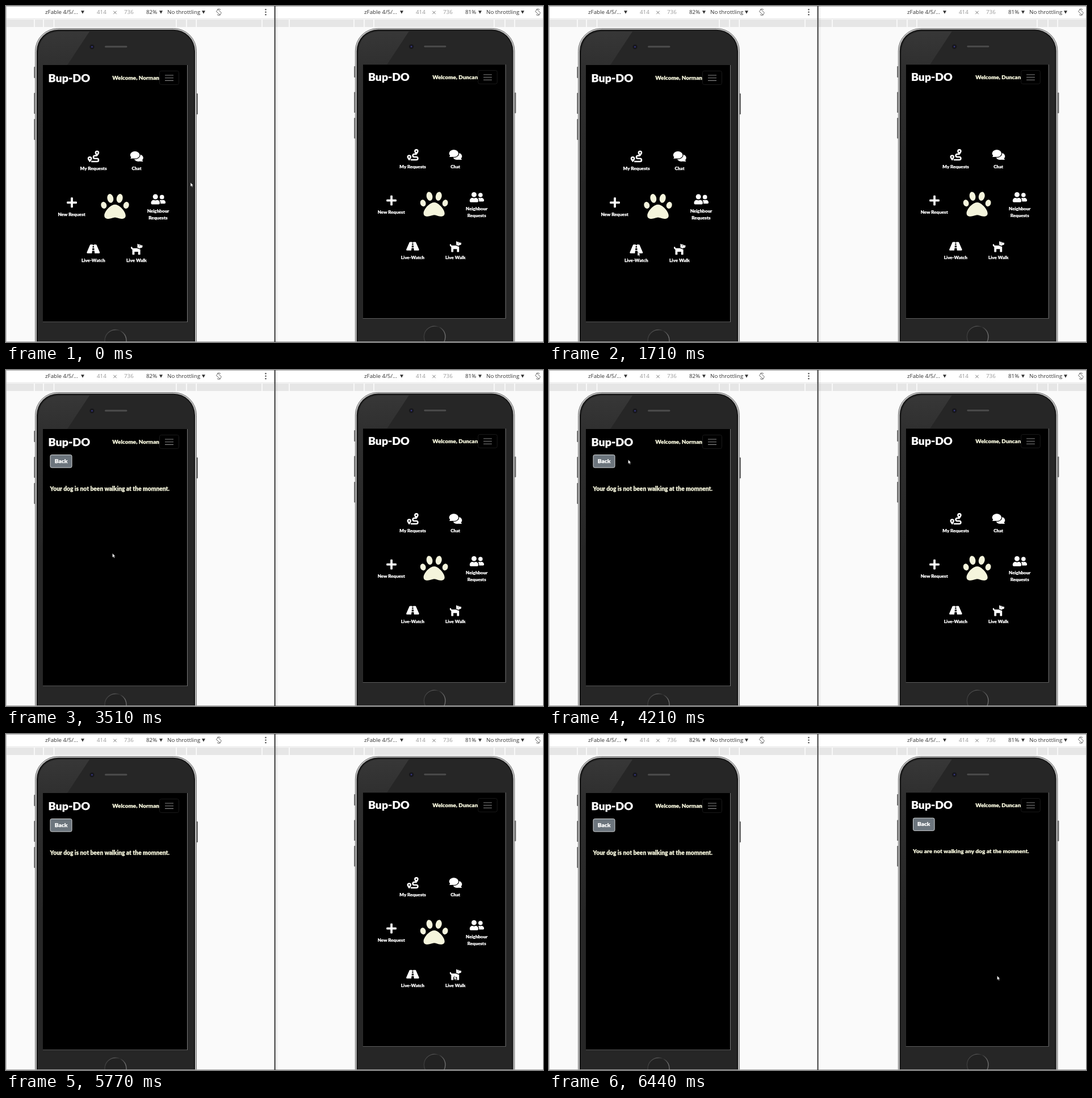
An HTML page that plays this animation: 946 by 592 pixels, repeating every 8 s.

```html
<!DOCTYPE html>
<html lang="en">
<head>
<meta charset="utf-8">
<title>Two device previews</title>
<style>
  html, body { margin: 0; width: 100%; height: 100%; overflow: hidden; background: #fafafa; }
  svg { display: block; width: 100vw; height: 100vh; }
  .bar { font: 9.8px "Open Sans", "Noto Sans", sans-serif; fill: #333; }
  .bar .dim { fill: #999; }
  .app { font-family: Lato, "Open Sans", sans-serif; font-weight: 900; }
  .app text { stroke-width: .25; stroke-linejoin: round; }
  .white { fill: #fff; stroke: #fff; }
  .beige { fill: #f5f5dc; stroke: #f5f5dc; }
  .label { font-size: 8.1px; text-anchor: middle; }
</style>
</head>
<body>
<svg id="stage" viewBox="0 0 946 592" xmlns="http://www.w3.org/2000/svg"></svg>
<script>
const LOOP = 8000;
const LEFT_OPENS = 1860, RIGHT_OPENS = 6440;

// time, x, y: the pointer is held until the next entry
const pointer = [
  [0, 325, 311], [280, 459, 342], [510, 520, 345], [630, 470, 358],
  [760, 330, 385], [880, 220, 405], [1010, 162, 416], [1160, 158, 427],
  [1280, 156, 432], [1430, 156, 433], [2720, 168, 408], [2840, 187, 362],
  [2960, 199, 331], [3110, 193, 330], [3230, 189.5, 331], [3510, 187.5, 323],
  [3660, 183, 268], [3780, 175, 209], [3930, 162, 180], [4060, 148.5, 159],
  [4210, 139.5, 158], [4360, 121, 158], [4520, 101.5, 160], [4950, 710, 405],
  [5200, 793, 408], [5350, 821, 425], [5500, 806, 425], [5650, 795, 426],
  [5770, 789.5, 426]
];

const rect = (x, y, w, h, fill, r = 0, more = '') =>
  `<rect x="${x}" y="${y}" width="${w}" height="${h}" rx="${r}" fill="${fill}" ${more}/>`;
const circle = (x, y, r, more = '') => `<circle cx="${x}" cy="${y}" r="${r}" ${more}/>`;
const oval = (x, y, rx, ry, more = '') => `<ellipse cx="${x}" cy="${y}" rx="${rx}" ry="${ry}" ${more}/>`;
const path = (d, more = '') => `<path d="${d}" ${more}/>`;
const text = (x, y, words, cls, more = '') => `<text x="${x}" y="${y}" class="${cls}" ${more}>${words}</text>`;

// Icons are drawn on a 512-unit high grid and centred on x, y
const icon = (x, y, w, shapes, scale = .04, fill = '#fff') =>
  `<g transform="translate(${x} ${y}) scale(${scale}) translate(${-w / 2} -256)" fill="${fill}">${shapes}</g>`;

const pin = path('M96 256a96 96 0 0 0-96 96c0 53 96 160 96 160s96-107 96-160a96 96 0 0 0-96-96zm0 64a32 32 0 1 1 0 64 32 32 0 1 1 0-64z', 'fill-rule="evenodd"');
const route = pin + `<g transform="translate(320 -256)">${pin}</g>` +
  path('M160 480H416a64 64 0 0 0 0-128H320a64 64 0 0 1 0-128H416', 'fill="none" stroke="#fff" stroke-width="64"');

const chat = oval(368, 320, 208, 160) + path('M568 478Q530 440 516 380L430 466Q500 484 568 478z') +
  oval(208, 192, 240, 192, 'fill="#000"') +
  oval(208, 192, 208, 160) + path('M8 350Q46 312 56 250L146 338Q80 356 8 350z');

const plus = rect(0, 208, 448, 96, '#fff', 32) + rect(176, 32, 96, 448, '#fff', 32);

const people = circle(192, 144, 112) + circle(480, 160, 96) +
  path('M269 288h-8a160 160 0 0 1-138 0h-8A115 115 0 0 0 0 403v29a48 48 0 0 0 48 48h288a48 48 0 0 0 48-48v-29a115 115 0 0 0-115-115z') +
  path('M528 288h-4a126 126 0 0 1-88 0h-4q-30 0-56 15 40 43 40 101v44h176a48 48 0 0 0 48-48a112 112 0 0 0-112-112z');

const road = path('M170 64Q150 64 142 83L3 403Q-6 448 30 448H227L238 350Q240 336 254 336H322Q336 336 338 350L349 448H545Q582 448 573 403L433 83Q425 64 406 64H308L311 96H265L268 64z' +
  'M261 128H315L322 192H254zM251 224H325L333 304H243z', 'fill-rule="evenodd"');

const dog = path('M298 224L448 278V496a16 16 0 0 1-16 16h-64a16 16 0 0 1-16-16V384H192v112a16 16 0 0 1-16 16h-64a16 16 0 0 1-16-16V282C59 269 32 234 32 192a32 32 0 0 1 64 0 32 32 0 0 0 32 32z') +
  path('M544 112v32a64 64 0 0 1-64 64h-32v36l-128-46V48c0-14 17-21 27-11l28 27h53q20 2 29 18l7 14h64a16 16 0 0 1 16 16zm-112 0a16 16 0 1 0-32 0 16 16 0 0 0 32 0z', 'fill-rule="evenodd"');

const toes = oval(54, 236, 50, 62, 'transform="rotate(-18 54 236)"') +
  oval(172, 112, 55, 81, 'transform="rotate(-12 172 112)"');
const paw = toes + `<g transform="translate(512) scale(-1 1)">${toes}</g>` +
  path('M256 224c-79 0-192 123-192 200c0 35 27 56 72 56c49 0 81-25 120-25c40 0 72 25 120 25c45 0 72-21 72-56C448 347 335 224 256 224z');

const label = (x, y, words) => text(x, y, words, 'label white');

const menu = () =>
  icon(154, 265, 512, route) + label(154, 289, 'My Requests') +
  icon(230.3, 265, 576, chat) + label(230, 289, 'Chat') +
  icon(116, 346.3, 448, plus) + label(115.7, 370, 'New Request') +
  icon(192, 353, 512, paw, .0977, '#f5f5dc') +
  icon(268.3, 340.5, 640, people) + label(268, 364, 'Neighbour') + label(268, 376, 'Requests') +
  icon(153.8, 428, 576, road) + label(153.8, 451.3, 'Live-Watch') +
  icon(230.2, 428, 576, dog) + label(230, 451.3, 'Live Walk');

const notice = words =>
  rect(78, 149.5, 38, 22.5, '#6c757d', 2.5, 'stroke="#d5d8da"') +
  text(97, 164, 'Back', 'white', 'font-size="10.2" text-anchor="middle"') +
  text(77.6, 212.6, words, 'beige', 'font-size="10.25"');

const sideKey = (x, y, h) => rect(x, y, 2.5, h, '#666', 1);

function phone(id, user, words) {
  return sideKey(49.3, 107, 20) + sideKey(49.3, 153, 37) + sideKey(49.3, 199, 37) + sideKey(335.5, 154, 37) +
    rect(51.5, 39.5, 284, 620, '#bdbdbd', 40, 'stroke="#777"') +
    rect(54, 41.7, 279, 620, '#141414', 38) +
    rect(56, 43.5, 275, 620, '#262626', 36) +
    path('M92 45H147L108 104H65V300L57 330V84Q58 48 92 45z', 'fill="url(#glare)"') +
    circle(151.5, 72, 4.2, 'fill="#17171c"') + circle(151.5, 72, 1.3, 'fill="#39398c"') +
    rect(173.5, 69.7, 40.5, 4, '#4b4b4b', 2, 'stroke="#1b1b1b" stroke-width=".6"') +
    circle(193, 589.5, 19, 'fill="#222" stroke="url(#ring)" stroke-width="1.3"') +
    rect(65, 104, 255, 453, '#777') + rect(65, 104, 254, 452.3, '#000') +
    '<g class="app">' +
    text(74.5, 133.5, 'Bup-DO', 'white', 'font-size="19.6"') +
    text(270, 130, `Welcome, ${user}`, 'beige', 'font-size="9.9" text-anchor="end"') +
    rect(270.5, 114.5, 34, 24, 'none', 3, 'stroke="#1a1a1a"') +
    path('M280 122H295M280 126.7H295M280 131.4H295', 'stroke="#858585" stroke-width="1.1"') +
    `<g id="menu${id}">${menu()}</g><g id="notice${id}">${notice(words)}</g></g>`;
}

const caret = x => path(`M${x - 3} 8.3h6l-3 5.4z`, 'fill="#333"');

function toolbar(x, zoom) {
  return `<g class="bar" transform="translate(${x})">` +
    text(69, 14.3, 'zFable 4/5/...', '') + caret(135) +
    text(160, 14.3, '414', 'dim') + path('M189.3 8.8l5.4 5.4m0-5.4l-5.4 5.4', 'stroke="#777"') +
    text(208, 14.3, '736', 'dim') +
    text(247, 14.3, zoom, '') + caret(273) +
    text(284, 14.3, 'No throttling', '') + caret(348) +
    '<g transform="translate(375 10.8) rotate(-45)" fill="none" stroke="#555" stroke-width=".9">' +
    rect(-2.3, -4.2, 4.6, 8.4, 'none', .8) + path('M-5.3 1A5.4 5.4 0 0 0-1 5.5M5.3-1A5.4 5.4 0 0 0 1-5.5') +
    '</g></g>';
}

const ruler = (x, w, ticks) => rect(x, 24, w, 13, '#e6e6e6') +
  ticks.map(t => rect(t - .7, 24, 1.4, 13, '#fff')).join('');

const stage = document.getElementById('stage');
stage.innerHTML = `<defs>
  <linearGradient id="glare" x1="0" y1="0" x2="0" y2="1">
    <stop offset="0" stop-color="#373737"/><stop offset=".22" stop-color="#2f2f2f"/><stop offset="1" stop-color="#262626"/>
  </linearGradient>
  <linearGradient id="ring">
    <stop offset="0" stop-color="#3c3c3c"/><stop offset=".45" stop-color="#555"/>
    <stop offset=".7" stop-color="#292929"/><stop offset="1" stop-color="#777"/>
  </linearGradient>
  <linearGradient id="shade">
    <stop offset="0" stop-color="#000" stop-opacity=".1"/><stop offset="1" stop-color="#000" stop-opacity="0"/>
  </linearGradient></defs>` +
  rect(0, 0, 946, 592, '#fafafa') + rect(0, 0, 946, 22.5, '#fff') + rect(0, 22, 946, 1, '#e3e3e3') +
  ruler(0, 472, [50, 66, 84.5, 300, 318, 335.3, 451]) +
  ruler(475, 471, [499, 613, 631, 648, 860, 879, 896]) +
  toolbar(0, '82%') + toolbar(562, '81%') +
  [6.2, 10.7, 15.2].map(y => circle(457.5, y, 1.25, 'fill="#555"')).join('') +
  phone(0, 'Norman', 'Your dog is not been walking at the momnent.') +
  `<g transform="translate(564.45 .4) scale(.988)">${phone(1, 'Duncan', 'You are not walking any dog at the momnent.')}</g>` +
  rect(0, 0, 946, 1, '#a5a5a5') + rect(0, 591, 946, 1, '#a5a5a5') + rect(0, 0, 1, 592, '#bbb') +
  rect(472.6, 0, 2, 592, '#3a3a3a') +
  rect(474.6, 0, 5, 592, 'url(#shade)', 0, 'id="shadow"') +
  path('M0 0V7.3L1.7 5.8L2.8 8.2L4 7.7L2.9 5.3H5z', 'id="pointer" fill="#fff" stroke="#222" stroke-width=".5"');

const part = id => document.getElementById(id);
const show = (id, on) => part(id).setAttribute('display', on ? 'inline' : 'none');

function draw(t) {
  [LEFT_OPENS, RIGHT_OPENS].forEach((start, i) => {
    show('menu' + i, t < start);
    show('notice' + i, t >= start);
  });
  show('shadow', t < RIGHT_OPENS);
  const [, x, y] = pointer.filter(p => p[0] <= t).pop();
  part('pointer').setAttribute('transform', `translate(${x} ${y})`);
}

const begin = performance.now();
function tick() {
  draw((performance.now() - begin) % LOOP);
  requestAnimationFrame(tick);
}
tick();
</script>
</body>
</html>
```
